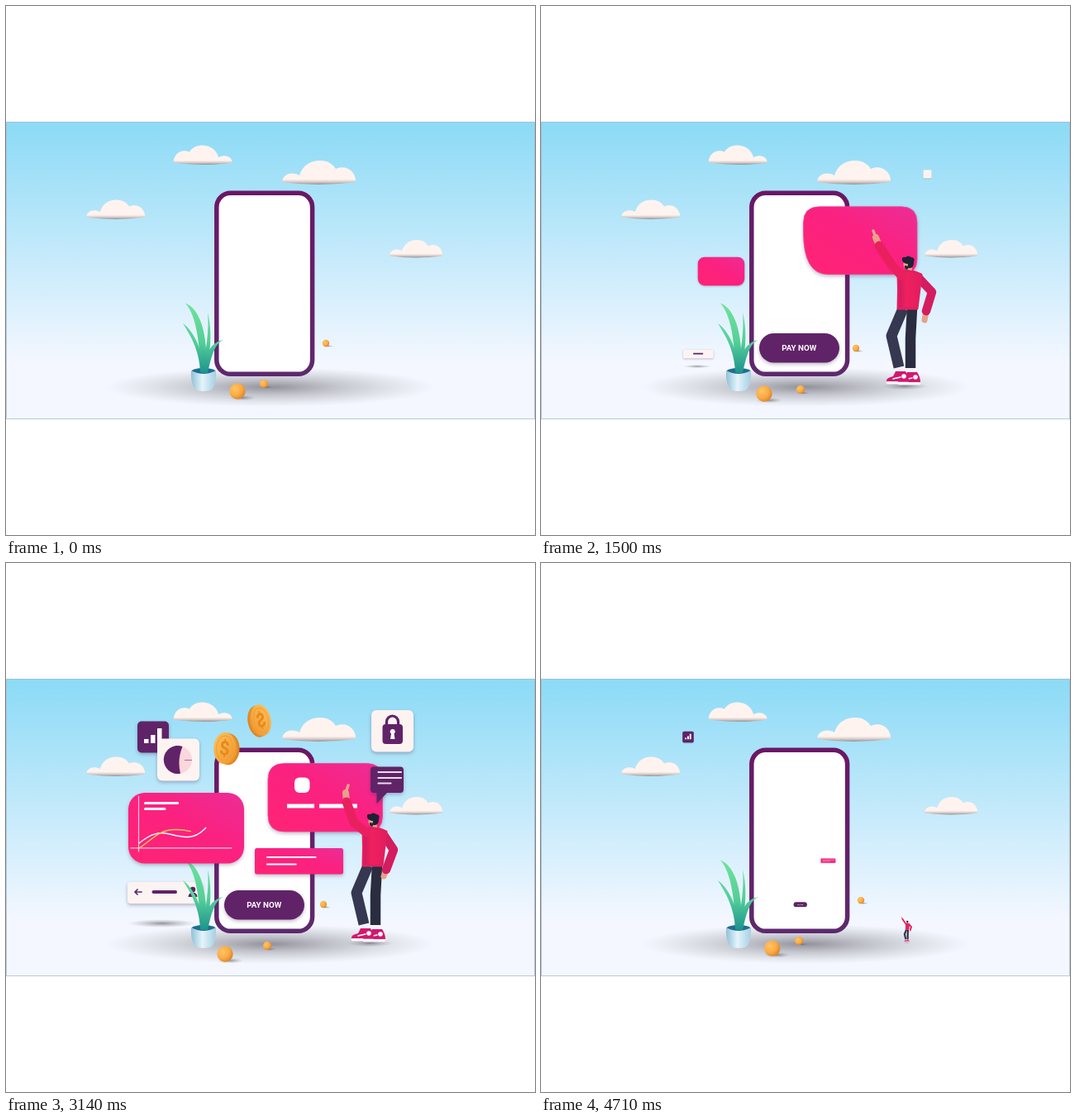
These frames come from a looping animation (640 px wide and 640 px high, 4780 ms). An HTML page:

```html
<!DOCTYPE html>
<html lang="en">
<head>
<meta charset="utf-8">
<title>Pay now</title>
<style>
html, body { margin: 0; width: 100%; height: 100%; overflow: hidden; background: #fff; }
svg { display: block; width: 100%; height: 100%; }
.ln { fill: none; stroke: #fff; stroke-linecap: round; stroke-linejoin: round; }
.limb { fill: none; stroke-linecap: round; stroke-linejoin: round; }
.lift { filter: drop-shadow(0 2px 2px rgba(60, 40, 80, .32)); }
</style>
</head>
<body>
<svg viewBox="0 0 640 640">
<defs>
  <linearGradient id="sky" gradientUnits="userSpaceOnUse" x1="0" y1="148" x2="0" y2="432">
    <stop stop-color="#8edbf6"/><stop offset="1" stop-color="#f4f7ff"/>
  </linearGradient>
  <linearGradient id="puff" x2="0" y2="1">
    <stop offset=".78" stop-color="#fef3ef"/><stop offset=".9" stop-color="#d5c8c5"/><stop offset="1" stop-color="#8f8f92"/>
  </linearGradient>
  <linearGradient id="pink" x1="0" y1="1" x2="1" y2="0">
    <stop stop-color="#ff2474"/><stop offset=".55" stop-color="#fb2180"/><stop offset="1" stop-color="#ec2d96"/>
  </linearGradient>
  <linearGradient id="leaf" gradientUnits="userSpaceOnUse" x1="0" y1="360" x2="0" y2="444">
    <stop stop-color="#6fe39a"/><stop offset=".55" stop-color="#55cf98"/><stop offset="1" stop-color="#1d938e"/>
  </linearGradient>
  <linearGradient id="pot"><stop stop-color="#8fc0d6"/><stop offset=".45" stop-color="#e4f4fb"/><stop offset="1" stop-color="#a5cfe3"/></linearGradient>
  <linearGradient id="rim" x2="0" y2="1"><stop stop-color="#6b1766"/><stop offset="1" stop-color="#5d296d"/></linearGradient>
  <linearGradient id="gold" x2="1" y2="1"><stop stop-color="#ffc45c"/><stop offset="1" stop-color="#f0952c"/></linearGradient>
  <linearGradient id="shirt"><stop stop-color="#c81b5f"/><stop offset=".35" stop-color="#f0205f"/><stop offset="1" stop-color="#e21d5e"/></linearGradient>
  <radialGradient id="orb" cx=".35" cy=".35" r=".7"><stop stop-color="#ffc566"/><stop offset=".6" stop-color="#fbab42"/><stop offset="1" stop-color="#dd8428"/></radialGradient>
  <radialGradient id="dim">
    <stop stop-color="#55535c" stop-opacity=".62"/><stop offset=".4" stop-color="#66646e" stop-opacity=".34"/><stop offset="1" stop-color="#888" stop-opacity="0"/>
  </radialGradient>
  <path id="cloud" fill="url(#puff)" d="M0 26C1 16 12 13 21 18C25 5 35 0 46 0C56 0 62 5 65 10C78 4 90 14 89 26Q44 32 0 26Z"/>
  <g id="shoe">
    <path d="M-5 0H5V8H-5Z" fill="#f5f2f6"/>
    <path d="M-4 5L8 5Q12 11 12 17H-15Q-16 13 -7 11Z" fill="#d3176f"/>
    <path class="ln" d="M-14 19H11" stroke-width="2.4"/>
    <path class="ln" d="M-7 14L2 12" stroke-width="1.5"/>
    <circle cx="6" cy="11" r="2.8" fill="#fff"/>
  </g>
  <g id="disc">
    <ellipse cx="5" cy="1" rx="14" ry="18.5" fill="#dc8524"/>
    <ellipse cx="2.5" cy=".5" rx="14" ry="18.5" fill="#e9942d"/>
    <ellipse rx="14" ry="18.5" fill="url(#gold)"/>
    <ellipse rx="10.5" ry="14.5" fill="none" stroke="#f0a038" stroke-width="1.2"/>
    <text y="8" text-anchor="middle" font-family="Roboto, sans-serif" font-weight="700" font-size="23" fill="#e58a1f">$</text>
  </g>
  <g id="ball"><ellipse cx="6" cy="8" rx="16" ry="3.4" fill="url(#dim)"/><circle r="9.7" fill="url(#orb)"/></g>
</defs>

<rect x=".5" y="140.5" width="639" height="359" fill="url(#sky)" stroke="#7fa3c4" stroke-opacity=".55"/>
<use href="#cloud" x="334" y="187"/>
<use href="#cloud" transform="translate(274 168.5) scale(-.8 .81)"/>
<use href="#cloud" transform="translate(97 234.5) scale(.8 .81)"/>
<use href="#cloud" transform="translate(464 283) scale(.72 .74)"/>
<ellipse cx="320" cy="461" rx="200" ry="24" fill="url(#dim)"/>
<rect x="254.8" y="226.3" width="115.8" height="219" rx="17" fill="#fff" stroke="url(#rim)" stroke-width="5.5"/>

<g id="bar">
  <ellipse cx="189" cy="436" rx="42" ry="5" fill="url(#dim)"/>
  <g class="lift">
    <rect x="147" y="386" width="91" height="26" rx="4" fill="#fbf4f3"/>
    <path id="back" class="limb" d="M164 398H156M159 395L156 398L159 401" stroke="#5d2467" stroke-width="1.7"/>
    <path class="limb" d="M178.500 398H205" stroke="#5d2467" stroke-width="4"/>
    <g id="user" fill="#5d2467"><circle cx="226" cy="395" r="3.2"/><path d="M220.500 404Q221 398.500 226 398.500T231.500 404Z"/></g>
  </g>
</g>

<g id="plant">
  <ellipse cx="239" cy="442" rx="14.500" ry="4" fill="#1e6f90"/>
  <g fill="url(#leaf)">
    <path d="M238 444C240 410 237 374 217 359.500C231 375 234 410 236 444Z"/>
    <path d="M217 359.500C234 366 245 395 242 444H236C238 410 232 372 217 359.500Z"/>
    <path d="M214 384C228 394 238 417 240 443H235C234 417 224 400 214 384Z"/>
    <path d="M244 371C249 390 249 420 240 444H236C242 420 246 392 244 371Z"/>
    <path d="M263 404C253 407 248 425 244 444H238C240 422 248 406 263 404Z"/>
  </g>
  <path d="M224 441Q239 449 254 441Q255 454 250 463Q247 466 239 466T228 463Q223 454 224 441Z" fill="url(#pot)"/>
</g>

<g id="button">
  <rect class="lift" x="264" y="396" width="97" height="35.500" rx="17.750" fill="#602368"/>
  <text x="312.300" y="417.200" text-anchor="middle" font-family="Roboto, sans-serif" font-weight="700" font-size="9.800" fill="#fff">PAY NOW</text>
</g>

<g id="strip">
  <rect class="lift" x="301" y="345" width="107" height="31.500" rx="2.500" fill="url(#pink)"/>
  <path id="s1" class="ln" d="M316 356H402" stroke-width="2.200"/>
  <path id="s2" class="ln" d="M316 364.500H367" stroke-width="2.200"/>
</g>

<g id="card">
  <path id="cardBack" class="lift" fill="url(#pink)" stroke="#f0429a" stroke-width=".8"/>
  <rect id="chip" x="349" y="259.500" width="18.500" height="18.500" rx="6" fill="#fff"/>
  <path id="dash" class="ln" style="stroke-linecap:butt" stroke-width="5"/>
  <path id="arrow" d="M333.500 306L339.500 303V309Z" fill="#fff"/>
</g>

<g id="chart">
  <rect class="lift" x="148" y="278" width="140" height="85.500" rx="20" fill="url(#pink)"/>
  <path id="axX" class="ln" d="M151 344.800H273" stroke-width="1.200" stroke-opacity=".75"/>
  <path id="axY" class="ln" d="M160.500 349V282" stroke-width="1.200" stroke-opacity=".75"/>
  <path id="c1" class="ln" d="M161 339C176 327 185 325 198 328S226 336 239 323S255 303 271 303" stroke-width="1.400"/>
  <path id="c2" class="ln" d="M161 345C176 336 184 322 206 322.500S232 331 246 321S260 303 271 302" stroke="#ffc65a" stroke-width="1.400" style="stroke:#ffc65a"/>
  <path id="t1" class="ln" d="M168.500 290.500H208" stroke-width="3"/>
  <path id="t2" class="ln" d="M168.500 297.500H192" stroke-width="3"/>
</g>

<g id="stats">
  <rect class="lift" x="159" y="191.500" width="38" height="38" rx="5" fill="#602368"/>
  <path id="cols" d="M167 218V213H172.500V218ZM175 218V208H180.500V218ZM183 218V200H188.500V218Z" fill="#fff"/>
</g>

<g id="pie">
  <rect class="lift" x="183" y="212.500" width="51" height="51" rx="6" fill="#fdf4f2"/>
  <g id="slices">
    <circle cx="208" cy="238" r="17" fill="#fbd6dc"/>
    <path d="M213.500 222A17 17 0 1 0 211 254.700Q207 238 213.500 222Z" fill="#602368"/>
    <path d="M216 238.500H225" stroke="#8c5b8d" stroke-width=".8"/>
  </g>
</g>

<g id="coinA"><use id="discA" href="#disc"/></g>
<g id="coinB"><use id="discB" href="#disc"/></g>

<g id="lock">
  <rect class="lift" x="442" y="178" width="51" height="50.500" rx="6" fill="#fdf3f1"/>
  <g id="padlock">
    <path d="M460.500 196V192A7 7 0 0 1 474.500 192V196" fill="none" stroke="#602368" stroke-width="3.200"/>
    <rect x="455.500" y="195" width="24.500" height="24" rx="4" fill="#602368"/>
    <path d="M467.700 201A3 3 0 0 1 469.500 206.500L470.500 213H465L466 206.500A3 3 0 0 1 467.700 201Z" fill="#fff"/>
  </g>
</g>

<g id="chat">
  <path class="lift" d="M445 246.500H477Q481 246.500 481 250.500V274Q481 278 477 278H461L448.500 291V278H445Q441 278 441 274V250.500Q441 246.500 445 246.500Z" fill="#602368"/>
  <path class="ln" d="M450.500 253H478M450.500 260H478M450.500 266.500H465.500" stroke-width="2.200" stroke-opacity=".85"/>
</g>

<g id="man">
  <ellipse id="shade" rx="28" ry="4.500" fill="url(#dim)"/>
  <use id="footB" href="#shoe"/>
  <path id="legB" class="limb" stroke="#2a2c3f" stroke-width="12.500" style="stroke-linecap:butt"/>
  <use id="footF" href="#shoe"/>
  <path id="legF" class="limb" stroke="#353850" stroke-width="13" style="stroke-linecap:butt"/>
  <path id="handR" class="limb" stroke="#e8a18a" stroke-width="7"/>
  <path id="armR" class="limb" stroke="#d41c5e" stroke-width="10.500"/>
  <path id="handL" class="limb" stroke="#e8a18a" stroke-width="8"/>
  <path id="finger" class="limb" stroke="#e8a18a" stroke-width="3.500"/>
  <path id="torso" fill="url(#shirt)" stroke="#e21f5f" stroke-width="3" stroke-linejoin="round"/>
  <path id="armL" class="limb" stroke="#ea1f60" stroke-width="11"/>
  <g id="head">
    <path d="M-5 -2Q-7 6 -1 8L5 9L4 0Z" fill="#e8a18a"/>
    <path d="M-7 -3Q-8 -8 -3 -7Q0 -10 4 -7Q9 -7 7 -1Q7 5 3 6Q-1 7 0 1Q-5 1 -7 -3Z" fill="#1f2036"/>
    <path d="M-4 3Q-5 7 -1 8L2 4Z" fill="#24243a"/>
  </g>
</g>

<use id="b1" href="#ball"/><use id="b2" href="#ball"/><use id="b3" href="#ball"/>
</svg>

<script>
const LOOP = 4780, POP = 370;
const $ = id => document.getElementById(id);
const set = (id, name, value) => $(id).setAttribute(name, value);
const clamp = v => Math.min(1, Math.max(0, v));
const lin = (t, from, to) => clamp((t - from) / (to - from));
const ease = (t, from, to) => { const s = lin(t, from, to); return s * s * (3 - 2 * s); };
const mix = (a, b, k) => a + (b - a) * k;

// id, pivot x, pivot y, enter time, leave time
const pops = [
  ['bar', 189, 436, 1340, 4088],
  ['button', 314, 413, 130, 4437],
  ['strip', 346, 360, 1690, 4437],
  ['card', 386, 284, 1150, 4290],
  ['chart', 218, 321, 1340, 4290],
  ['stats', 178, 210.5, 1874, 4490],
  ['pie', 208, 238, 1722, 4290],
  ['coinA', 267, 224, 1590, 4070],
  ['coinB', 307, 191, 1590, 4088],
  ['lock', 467.5, 203.5, 1394, 4088],
  ['chat', 448, 291, 1540, 4088],
  ['man', 443, 459, -POP, 4437]
];

// id, pivot x, pivot y, enter time, duration
const parts = [
  ['chip', 358, 268.5, 1860, 310],
  ['slices', 208, 238, 1880, 400],
  ['padlock', 467.5, 205, 1700, 430],
  ['cols', 178, 218, 2150, 350],
  ['back', 160, 398, 1830, 280],
  ['user', 226, 404, 1920, 300],
  ['arrow', 337, 306, 3550, 300]
];

// id, start, end of the line being drawn
const lines = [
  ['axX', 1840, 2170], ['axY', 1840, 2190],
  ['t1', 2250, 3150], ['t2', 2350, 3000],
  ['c1', 2250, 3500], ['c2', 2430, 3720],
  ['s1', 2250, 3560], ['s2', 2250, 3560]
];

const balls = [
  ['b1', 1, [0, 280, 466, 570, 278, 466, 1500, 270, 469, 2000, 266, 471, 2550, 264, 473, 3140, 265, 473, 4210, 278, 467, LOOP, 280, 466]],
  ['b2', .52, [0, 312, 457, 570, 311, 458, 1500, 314, 464, 2000, 316, 466, 3140, 316, 463, 4210, 313, 458, LOOP, 312, 457]],
  ['b3', .43, [0, 387, 408, 570, 385, 409, 1500, 381, 414, 2000, 381, 417, 3140, 384, 413, 4210, 387, 409, LOOP, 387, 408]]
];

const leap = {
  tip: [438, 258], hand: [431, 264], wristL: [425, 271], elbowL: [422, 291], shL: [439, 309],
  shR: [460, 311], elbowR: [473, 331], wristR: [461, 358], palm: [458, 368], head: [452, 297],
  hipF: [441, 351], kneeF: [413, 380], ankF: [434, 411], hipB: [451, 351], kneeB: [447, 382], ankB: [447, 422], shade: [441, 449]
};
const stand = {
  tip: [402, 272], hand: [405, 280], wristL: [409, 290], elbowL: [424, 313], shL: [436, 326],
  shR: [457, 329], elbowR: [473, 346], wristR: [466, 369], palm: [464, 380], head: [444, 311],
  hipF: [438, 366], kneeF: [424, 399], ankF: [433, 437], hipB: [449, 366], kneeB: [447, 402], ankB: [447, 438], shade: [440, 460]
};
const wave = { ...stand, tip: [414, 269], hand: [411, 278], wristL: [412, 289], elbowL: [421, 314], elbowR: [469, 347], wristR: [460, 371], palm: [457, 379] };

const blend = (a, b, k) => Object.fromEntries(Object.keys(a).map(j => [j, a[j].map((v, i) => mix(v, b[j][i], k))]));
const scaleAt = (id, x, y, s) => set(id, 'transform', `translate(${x} ${y}) scale(${s}) translate(${-x} ${-y})`);

function along(keys, t) {
  let i = 0;
  while (t > keys[i + 3]) i += 3;
  const k = lin(t, keys[i], keys[i + 3]);
  return [mix(keys[i + 1], keys[i + 4], k), mix(keys[i + 2], keys[i + 5], k)];
}

function drawMan(t) {
  const land = ease(t, 690, 930);
  const p = t < 1200 ? blend(leap, stand, land) : blend(stand, wave, ease(t, 2700, 3080) - ease(t, 3250, 3650));
  const dx = 215 * Math.pow(1 - lin(t, 70, 560), 2);
  const dy = 10 * Math.abs(Math.sin(dx / 30)) - 7 * (ease(t, 570, 680) - land);
  const at = (id, q, extra = '') => set(id, 'transform', `translate(${q[0] + dx} ${q[1] + dy}) ${extra}`);
  const limb = (id, ...pts) => {
    set(id, 'd', 'M' + pts.map(q => p[q].join()).join('L'));
    set(id, 'transform', `translate(${dx} ${dy})`);
  };
  limb('legB', 'hipB', 'kneeB', 'ankB');
  limb('legF', 'hipF', 'kneeF', 'ankF');
  limb('armL', 'wristL', 'elbowL', 'shL');
  limb('armR', 'shR', 'elbowR', 'wristR');
  limb('handR', 'wristR', 'palm');
  limb('handL', 'hand', 'wristL');
  limb('finger', 'tip', 'hand');
  const { shL: l, shR: r, hipF: f, hipB: b } = p;
  set('torso', 'd', `M${l[0] - 4} ${l[1] - 3}Q${l[0] + 9} ${l[1] - 9} ${r[0] + 3} ${r[1] - 4}L${b[0] + 6} ${b[1]}H${f[0] - 6}Q${f[0] - 5} ${f[1] - 22} ${l[0] - 4} ${l[1] - 3}Z`);
  set('torso', 'transform', `translate(${dx} ${dy})`);
  at('head', p.head);
  at('footB', p.ankB);
  at('footF', p.ankF, `rotate(${-32 * (t < 1200 ? 1 - land : 0)})`);
  set('shade', 'transform', `translate(${p.shade[0] + dx} ${p.shade[1]})`);
  $('man').style.display = t < 70 ? 'none' : '';
}

function drawCard(t) {
  const cut = 1 - ease(t, 1350, 1720);
  const w = mix(20, 36, cut), h = mix(20, 70, cut);
  set('cardBack', 'd', `M337 242.500H436Q455.500 242.500 455.500 262V306Q455.500 325 436 325H${317 + w}Q317 325 317 ${325 - h}V262Q317 242.500 337 242.500Z`);
  const end = mix(340, 450, lin(t, 2300, 3390));
  set('dash', 'd', [[340, 373], [379, 412], [417, 450]]
    .filter(s => end > s[0]).map(s => `M${s[0]} 294H${Math.min(s[1], end)}`).join('') || 'M0 0');
}

function drawCoins(t) {
  const k = ease(t, 2000, 3100) - ease(t, 3200, 4200);
  set('discA', 'transform', `translate(264.500 224) rotate(${mix(18, 3, k)}) scale(${mix(1.05, .95, k)} 1.03)`);
  set('discB', 'transform', `translate(308.500 190) rotate(${mix(-55, -12, k)}) scale(${mix(-1, -.85, k)} ${mix(1, 1.03, k)})`);
}

function draw(t) {
  for (const [id, x, y, enter, leave] of pops)
    scaleAt(id, x, y, ease(t, enter, enter + POP) * (1 - ease(t, leave, leave + POP)));
  for (const [id, x, y, enter, span] of parts)
    scaleAt(id, x, y, ease(t, enter, enter + span));
  for (const [id, from, to] of lines) {
    const k = lin(t, from, to);
    set(id, 'stroke-dasharray', `${k} 2`);
    $(id).style.visibility = k ? 'visible' : 'hidden';
  }
  for (const [id, size, keys] of balls) {
    const [x, y] = along(keys, t);
    set(id, 'transform', `translate(${x} ${y}) scale(${size}) `);
  }
  drawCard(t);
  drawCoins(t);
  drawMan(t);
}

lines.forEach(([id]) => set(id, 'pathLength', 1));
const start = performance.now();
function tick() {
  draw((performance.now() - start) % LOOP);
  requestAnimationFrame(tick);
}
tick();
</script>
</body>
</html>
```
